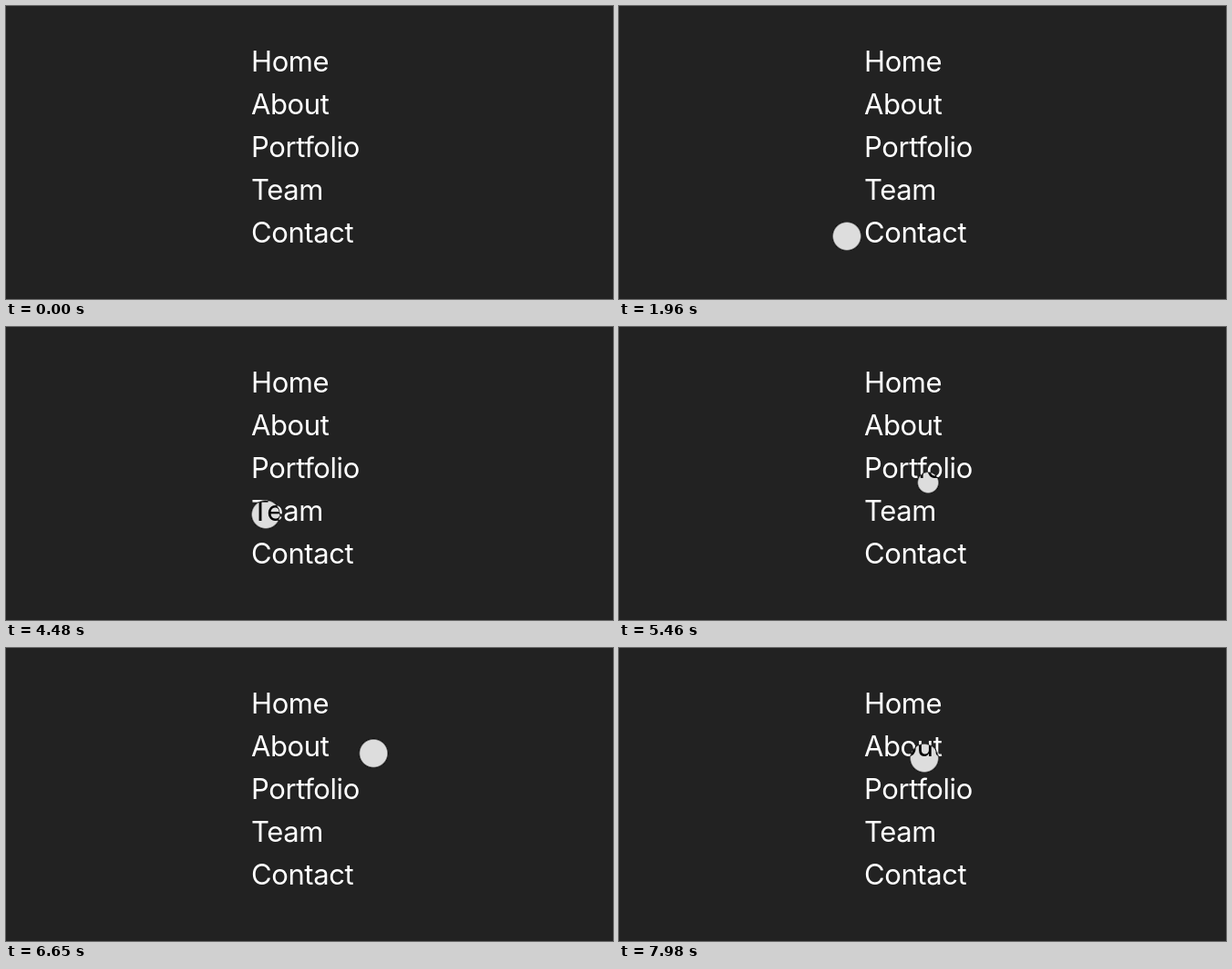
Animation of 666 by 322 pixels, one loop 8 s. Source, as an HTML page with a canvas:

```html
<!DOCTYPE html>
<html lang="en">
<head>
<meta charset="utf-8">
<title>Menu with inverting cursor</title>
<style>
  html, body { margin: 0; width: 100%; height: 100%; overflow: hidden; background: #222; }
  canvas { display: block; }
</style>
</head>
<body>
<canvas id="stage" width="666" height="322"></canvas>
<script>
const ctx = document.getElementById('stage').getContext('2d');
const LOOP = 8000;
const STEP = 70;
const ROW = 47;
const FIRST_GAP = 39;
const ITEMS = ['Home', 'About', 'Portfolio', 'Team', 'Contact'];

// Places the pointer visits, and how long it rests there.
const STOPS = [
  { at: 490, x: 250, y: 332 },
  { at: 700, x: 240, y: 276, rest: 210 },
  { at: 1260, x: 237, y: 254, rest: 350 },
  { at: 1960, x: 250, y: 253 },
  { at: 2240, x: 280, y: 252, rest: 490 },
  { at: 3290, x: 259, y: 233 },
  { at: 3570, x: 246, y: 229, rest: 280 },
  { at: 4480, x: 285, y: 206 },
  { at: 4760, x: 304, y: 204, rest: 280 },
  { at: 6020, x: 386, y: 127 },
  { at: 6860, x: 409, y: 112 },
  { at: 7350, x: 402, y: 112 },
  { at: 7560, x: 370, y: 117 },
  { at: 7980, x: 335, y: 121 }
];

const clamp = u => Math.min(1, Math.max(0, u));
const smooth = u => u * u * (3 - 2 * u);
const lerp = (a, b, u) => a + (b - a) * u;

function pointerAt(time) {
  if (time < STOPS[0].at) return null;
  const i = STOPS.findLastIndex(stop => stop.at <= time);
  const from = STOPS[i], to = STOPS[i + 1] || from;
  const leave = from.at + (from.rest || 0);
  const u = to === from ? 0 : clamp((time - leave) / (to.at - leave));
  return { x: lerp(from.x, to.x, u), y: lerp(from.y, to.y, u) };
}

// Small in the gaps between rows, large over a row.
function dotRadius(y) {
  const rows = (y - FIRST_GAP) / ROW;
  const distance = Math.abs(rows - Math.round(rows)) * ROW;
  return lerp(8, 16, smooth(clamp((distance - 7) / 4)));
}

function drawDot({ x, y }) {
  const outer = dotRadius(y) + 0.5;
  const edge = ctx.createRadialGradient(x, y, outer - 2, x, y, outer);
  edge.addColorStop(0, '#fff');
  edge.addColorStop(1, '#000');
  ctx.fillStyle = edge;
  ctx.beginPath();
  ctx.arc(x, y, outer, 0, Math.PI * 2);
  ctx.fill();
}

function draw(time) {
  ctx.globalCompositeOperation = 'source-over';
  ctx.fillStyle = '#222';
  ctx.fillRect(0, 0, 666, 322);
  ctx.fillStyle = '#fff';
  ctx.font = '400 31px Inter, sans-serif';
  ctx.letterSpacing = '-0.4px';
  ITEMS.forEach((label, i) => ctx.fillText(label, 269, 72 + ROW * i));

  const pointer = pointerAt(Math.floor(time / STEP) * STEP);
  if (!pointer) return;
  ctx.globalCompositeOperation = 'difference';
  drawDot(pointer);
}

function tick(now) {
  draw(now % LOOP);
  requestAnimationFrame(tick);
}

draw(0);
requestAnimationFrame(tick);
</script>
</body>
</html>
```
